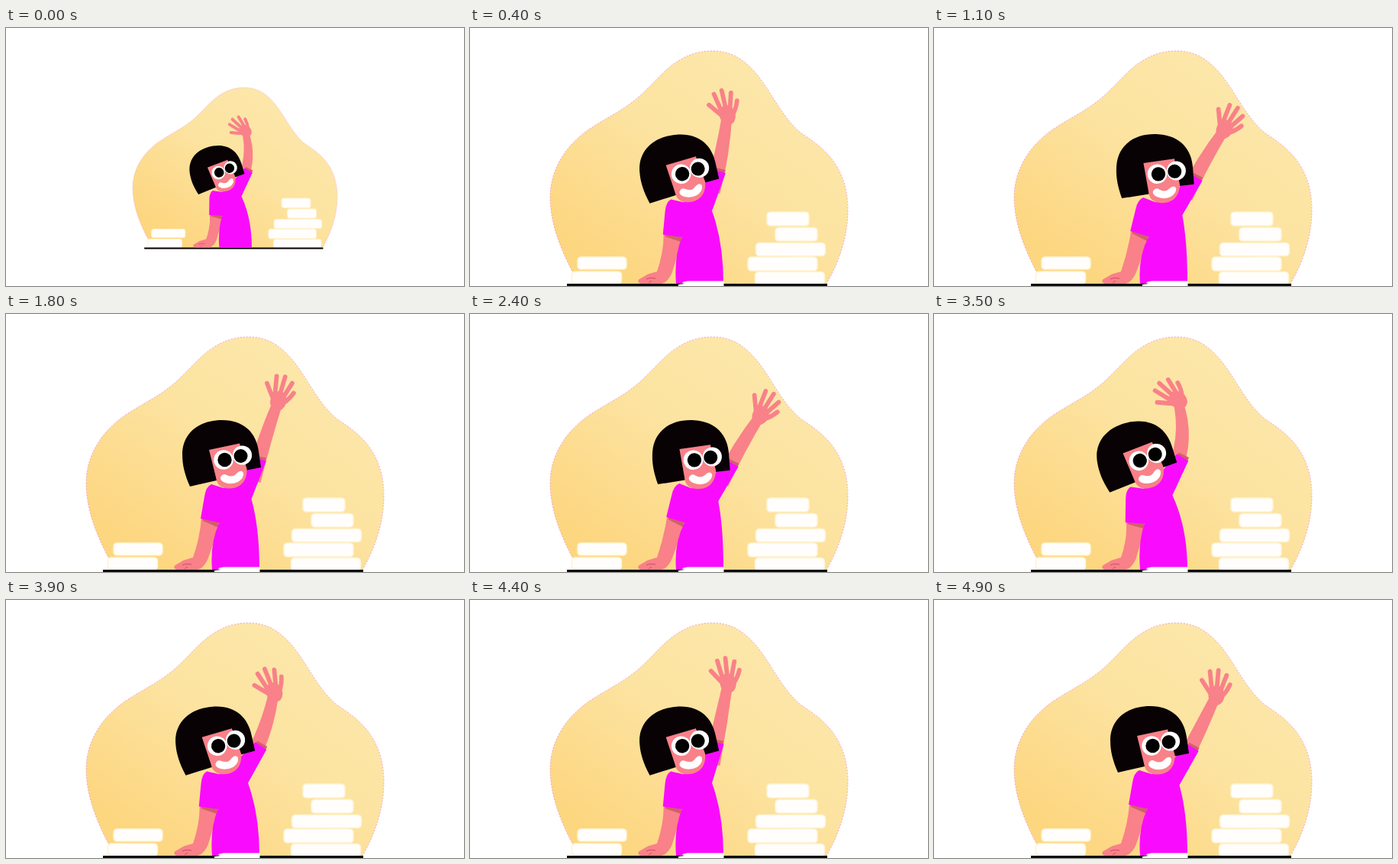
An HTML page that plays this animation: 600x338 px, repeating every 5 s.

```html
<!DOCTYPE html>
<html lang="en">
<head>
<meta charset="utf-8">
<title>Waving girl</title>
<style>
  html, body { margin: 0; width: 100%; height: 100%; overflow: hidden; background: #fff; }
  svg { display: block; width: 600px; height: 338px; }
  .skin { fill: #f98189; }
  .shade { fill: #d0606a; }
  .dress { fill: #f90cfd; }
  .hair { fill: #080205; }
  .books rect { fill: #fffefc; stroke: #fff3d4; stroke-width: 1.6; }
  #fingers { stroke: #f98189; stroke-width: 5.8; stroke-linecap: round; fill: none; }
</style>
</head>
<body>
<svg viewBox="0 0 600 338">
  <defs>
    <linearGradient id="sand" x1="0.75" y1="0.1" x2="0.1" y2="0.85">
      <stop offset="0" stop-color="#fce7aa"/>
      <stop offset="0.45" stop-color="#fce3a0"/>
      <stop offset="1" stop-color="#fdd680"/>
    </linearGradient>
  </defs>
  <g id="scene">
    <path fill="url(#sand)" stroke="#ee90cc" stroke-width="0.8" stroke-dasharray="2 2"
      d="M143 335C128 309 105 265 105 222C105 181 130 150 157 132C184 114 206 106 231 81C253 59 275 30 318 30C350 30 370 50 389 79C403 101 416 123 433 137C451 150 495 172 495 238C495 278 480 313 467 335Z"/>
    <g class="books">
      <rect x="141" y="300" width="64" height="16" rx="4.5"/>
      <rect x="133.500" y="319" width="65" height="16" rx="4.5"/>
      <rect x="389" y="241" width="55" height="18" rx="4.5"/>
      <rect x="400" y="261.500" width="55" height="17.500" rx="4.5"/>
      <rect x="374.500" y="281.500" width="91" height="17" rx="4.5"/>
      <rect x="364" y="300" width="91" height="18" rx="4.5"/>
      <rect x="373.500" y="319.500" width="91" height="16" rx="4.5"/>
    </g>
    <rect x="127" y="335" width="341" height="3" fill="#0c0407"/>
    <path id="prop" class="skin"/>
    <path id="cuff" class="shade"/>
    <path d="M231 329L236 327.500L243 328M234 334L238 331" fill="none" stroke="#c9505c" stroke-width="1"/>
    <path id="arm" class="skin"/>
    <path id="armShade" class="shade"/>
    <g id="hand">
      <ellipse class="skin" cx="0" cy="1" rx="10.500" ry="13"/>
      <path id="fingers" d="M-5 3Q-13 -8 -20 -18M-6 -4L-10 -30M0 -6L1 -32M5 -5L12 -26M7 2Q13 -4 17 -14"/>
    </g>
    <path id="dress" class="dress"/>
    <g id="head">
      <path class="hair" d="M241 226C234 210 231 198 231 184C231 156 253 139 283 139C312 139 328 156 331 180L334 201L308 206L276 218Z"/>
      <path class="skin" d="M266 178L306 169.500L315.500 203C316 218 308 228 293 228.500C282 229 276 223 275 214Z"/>
      <circle cx="285" cy="191" r="12.800" fill="#fff"/>
      <circle cx="309.500" cy="185" r="12.600" fill="#fff"/>
      <circle cx="286.500" cy="191" r="9.200"/>
      <circle cx="307.500" cy="186" r="9"/>
      <path fill="#fff" d="M281 214Q284 208 289 211Q297 215 302 209Q308 203 311 208Q312 215 304 220Q295 224 287 221Q280 218 281 214Z"/>
    </g>
  </g>
  <path id="gap" fill="#fff" d="M273 338V336L281 335Q274 333 285 331.500H332.500V338Z"/>
</svg>
<script>
const el = id => document.getElementById(id);
const TICK = 100, TICKS = 50, RAD = Math.PI / 180;
const PIVOT = [285, 298];
const ZOOM = [0.687, 0.98, 1.083, 1.04];

// one wave in eight steps: lean, palm x, palm y, hand angle, elbow bend
const WAVE = [
  [-9, 319, 112, -50, 20],
  [-7.5, 331, 115, -36, 13],
  [-4.5, 351, 120, -24, 9],
  [0, 370, 124, 3, 1],
  [4, 381, 132, 30, -4],
  [0, 357, 113, 14, -3],
  [-4.5, 338, 108, -8, 0],
  [-7.5, 324, 108, -32, 10]
];
const RISE = [-4.5, 337, 113, -15, 4];

const pt = (x, y) => x.toFixed(2) + ' ' + y.toFixed(2) + ' ';

function turn(x, y, deg) {
  const c = Math.cos(deg * RAD), s = Math.sin(deg * RAD);
  const dx = x - PIVOT[0], dy = y - PIVOT[1];
  return [PIVOT[0] + dx * c - dy * s, PIVOT[1] + dx * s + dy * c];
}

function draw(tick) {
  const zoom = ZOOM[tick] || 1;
  const pose = tick === 4 ? RISE : WAVE[Math.ceil(tick * 2.5) % 8];
  const [lean, px, py, tilt, bend] = pose;
  const u = (x, y) => pt(...turn(x, y, lean));

  el('scene').setAttribute('transform',
    `translate(300 183.4) scale(${zoom}) translate(-300 -183.4)`);
  el('gap').style.display = tick < 4 ? 'none' : '';
  el('head').setAttribute('transform', `rotate(${lean} ${PIVOT})`);
  el('hand').setAttribute('transform', `translate(${px} ${py}) rotate(${tilt})`);

  // raised arm: a tapered curve from shoulder to palm
  const [sx, sy] = turn(324, 218, lean);
  const len = Math.hypot(px - sx, py - sy);
  const nx = (sy - py) / len, ny = (px - sx) / len;
  const ex = (sx + px) / 2 + nx * bend, ey = (sy + py) / 2 + ny * bend;
  const side = (x, y, w) => pt(x + nx * w, y + ny * w);
  el('arm').setAttribute('d',
    'M' + side(sx, sy, -10) + 'Q' + side(ex, ey, -9.5) + side(px, py, -6.5) +
    'L' + side(px, py, 6.5) + 'Q' + side(ex, ey, 9.5) + side(sx, sy, 10) + 'Z');

  // sleeve end, square to the upper arm
  const a = Math.atan2(ex - sx, sy - ey) * 1.15;
  const c = Math.cos(a), s = Math.sin(a);
  const sleeve = (out, w) => pt(sx + s * out + c * w, sy - c * out + s * w);
  el('armShade').setAttribute('d',
    'M' + sleeve(27, -7) + 'L' + sleeve(32, -7.5) + 'L' + sleeve(33, 7.5) + 'L' + sleeve(27, 8) + 'Z');

  el('dress').setAttribute('d',
    'M' + u(269, 223) + 'Q' + u(262, 226) + u(260, 239) + 'L' + u(255, 268) +
    'L' + u(279.5, 273.5) + 'Q267 300 270 335L332 335Q332 280 ' + u(321.5, 242.5) +
    'L' + sleeve(29, 9) + 'L' + sleeve(29, -8.5) + 'L' + u(313, 209) +
    'L' + u(300, 225) + 'L' + u(285, 228) + 'Z');

  el('prop').setAttribute('d',
    'M' + u(256, 267) + 'Q254 293 245 319L233 322.5L221 329.5Q219 334 224 335L251 335Q259 333 264.5 321L' +
    u(279, 279) + 'L' + u(279, 270) + 'Z');
  el('cuff').setAttribute('d',
    'M' + u(257, 267) + 'L' + u(279, 272) + 'L' + u(278.5, 280) + 'L' + u(258, 271) + 'Z');
}

const start = performance.now();
function frame() {
  draw(Math.floor((performance.now() - start) / TICK) % TICKS);
  requestAnimationFrame(frame);
}
frame();
</script>
</body>
</html>
```
